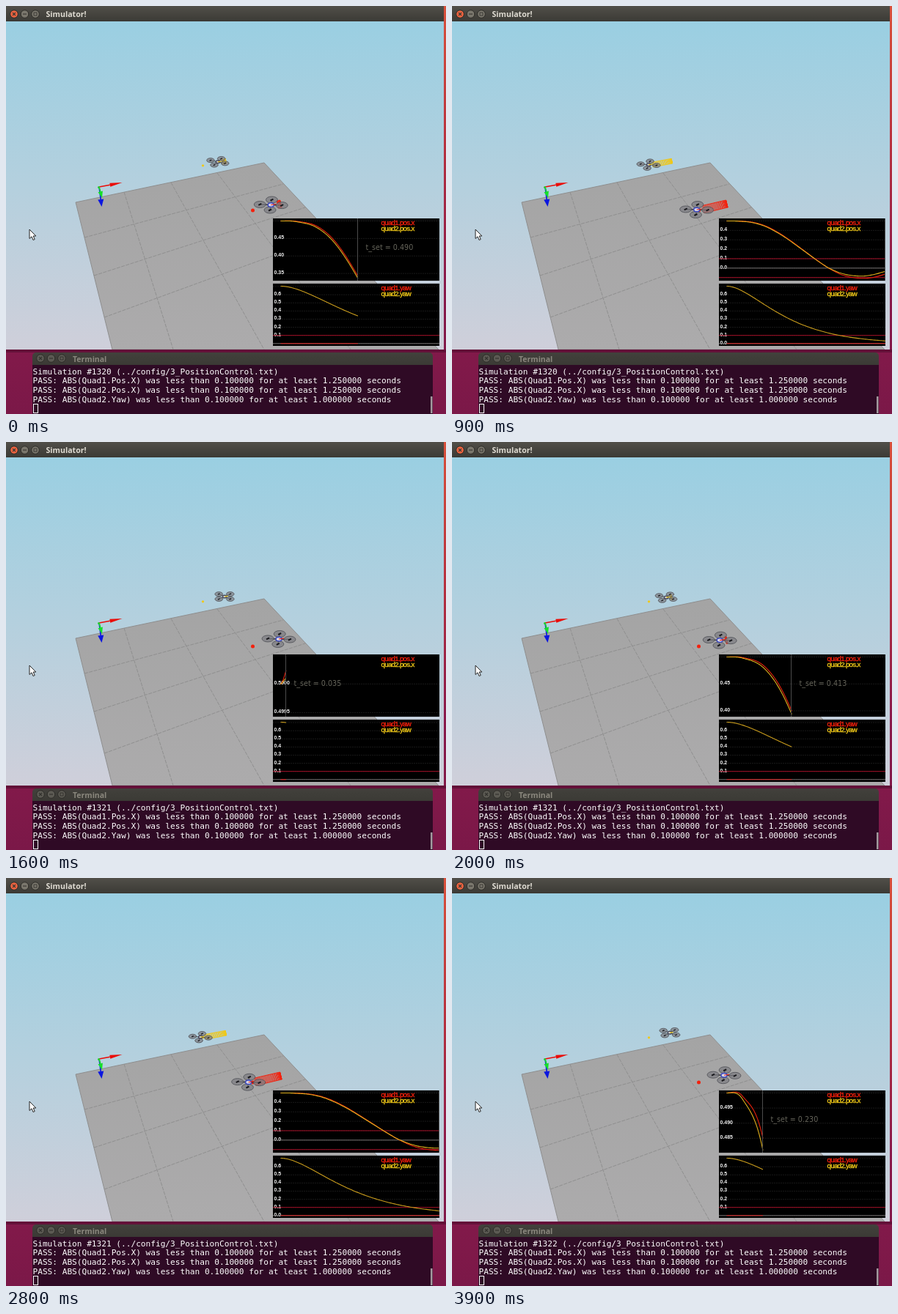
Recreate the animation shown at these times as an HTML page with a canvas. Size 600 by 557 pixels, loop 4 s.

```html
<!DOCTYPE html>
<html lang="en">
<head>
<meta charset="utf-8">
<title>Simulator</title>
<style>
  html, body { margin: 0; width: 100%; height: 100%; overflow: hidden; background: #7c1a48; }
  canvas { display: block; }
</style>
</head>
<body>
<canvas id="stage" width="600" height="557"></canvas>
<script>
const ctx = document.getElementById('stage').getContext('2d');
const RED = '#f4200c', YELLOW = '#f0c818';

// Position over time as [seconds, metres] for both vehicles.
const PATH1 = [[0, .5], [.1, .499], [.23, .485], [.35, .439], [.49, .342], [.65, .2], [.785, .076], [.88, -.002],
  [1, -.075], [1.14, -.107], [1.25, -.1], [1.39, -.055], [1.557, .005], [1.75, .035], [2.2, .015]];
const PATH2 = [[0, .5], [.1, .498], [.23, .481], [.35, .433], [.49, .336], [.65, .196], [.785, .075], [.88, 0],
  [1, -.06], [1.14, -.085], [1.25, -.072], [1.39, -.025], [1.557, .033], [1.75, .05], [2.2, .015]];

function sample(path, t) {
  let i = 0;
  while (i < path.length - 2 && path[i + 1][0] < t) i++;
  const slope = k => {
    if (k === 0) return 0;
    const a = path[k - 1], b = path[Math.min(k + 1, path.length - 1)];
    return (b[1] - a[1]) / (b[0] - a[0]);
  };
  const [t0, v0] = path[i], [t1, v1] = path[i + 1];
  const h = t1 - t0, u = (t - t0) / h, w = 1 - u;
  return v0 * (1 + 2 * u) * w * w + h * slope(i) * u * w * w
    + v1 * u * u * (3 - 2 * u) - h * slope(i + 1) * u * u * w;
}

const pos1 = t => sample(PATH1, t);
const pos2 = t => sample(PATH2, t);
const yaw = t => .705 * (1 + 3.55 * t) * Math.exp(-3.55 * t);

function settleTime(t) {
  let s = t;
  while (s > 0 && Math.abs(pos1(s)) < .055) s -= .005;
  return s;
}

function rect(x, y, w, h, fill) {
  ctx.fillStyle = fill;
  ctx.fillRect(x, y, w, h);
}

function line(points, color, width = 1, dash = []) {
  ctx.beginPath();
  points.forEach(([x, y]) => ctx.lineTo(x, y));
  ctx.strokeStyle = color;
  ctx.lineWidth = width;
  ctx.setLineDash(dash);
  ctx.stroke();
  ctx.setLineDash([]);
}

function polygon(points, fill) {
  ctx.beginPath();
  points.forEach(([x, y]) => ctx.lineTo(x, y));
  ctx.closePath();
  ctx.fillStyle = fill;
  ctx.fill();
}

function ellipse(x, y, rx, ry, fill, stroke, width = 1) {
  ctx.beginPath();
  ctx.ellipse(x, y, rx, ry, 0, 0, 7);
  if (fill) { ctx.fillStyle = fill; ctx.fill(); }
  if (stroke) { ctx.strokeStyle = stroke; ctx.lineWidth = width; ctx.stroke(); }
}

function text(str, x, y, font, color, baseline = 'alphabetic') {
  ctx.font = font;
  ctx.fillStyle = color;
  ctx.textBaseline = baseline;
  ctx.fillText(str, x, y);
}

function gradient(y0, y1, ...colors) {
  const g = ctx.createLinearGradient(0, y0, 0, y1);
  colors.forEach((c, i) => g.addColorStop(i / (colors.length - 1), c));
  return g;
}

function titleBar(x, y, w, h, radius, active) {
  ctx.beginPath();
  ctx.roundRect(x, y, w, h, [radius, radius, 0, 0]);
  ctx.fillStyle = gradient(y, y + h, active ? '#514f49' : '#42413c', '#3b3a35');
  ctx.fill();
  const cy = y + h / 2 + (active ? .5 : -.5);
  const ring = '#2e2d29';
  [11, 25.5, 40].forEach((dx, i) => {
    const cx = x + dx, mark = active ? '#3b3934' : '#34332f';
    ellipse(cx, cy, 5.3, 5.3, active ? (i ? '#7a776d' : '#ee6440') : '#5c5a53', ring);
    if (i === 0) {
      line([[cx - 2, cy - 2], [cx + 2, cy + 2]], mark, 1.2);
      line([[cx + 2, cy - 2], [cx - 2, cy + 2]], mark, 1.2);
    } else if (i === 1) line([[cx - 2.5, cy], [cx + 2.5, cy]], mark, 1.2);
    else {
      ctx.lineWidth = 1;
      ctx.strokeStyle = mark;
      ctx.strokeRect(cx - 2, cy - 2, 4, 4);
    }
  });
}

function drawDesktop() {
  rect(0, 0, 600, 557, gradient(0, 557, '#d8513c', '#b8323f', '#8a1b4c', '#7b1848'));
  rect(0, 469, 600, 4, 'rgba(40,0,25,.35)');
}

function drawTerminal(number) {
  titleBar(36, 473, 546, 17, 5, false);
  text('Terminal', 91, 485.5, 'bold 10.5px "Open Sans", sans-serif', '#8b887e');
  rect(36, 490, 546, 67, '#2f0a25');
  const check = (name, time) => `PASS: ABS(${name}) was less than 0.100000 for at least ${time} seconds`;
  const rows = [
    `Simulation #${number} (../config/3_PositionControl.txt)`,
    check('Quad1.Pos.X', '1.250000'),
    check('Quad2.Pos.X', '1.250000'),
    check('Quad2.Yaw', '1.000000'),
  ];
  rows.forEach((row, i) =>
    text(row, 36.5, 502.5 + i * 12.7, '11.14px "DejaVu Sans Mono", monospace', '#fff'));
  ctx.lineWidth = 1;
  ctx.strokeStyle = '#fff';
  ctx.strokeRect(37.5, 543.5, 6, 12);
  rect(579, 533, 2.5, 23, '#a49a9f');
}

function arrow(x0, y0, x1, y1, head, half, color) {
  const len = Math.hypot(x1 - x0, y1 - y0), ux = (x1 - x0) / len, uy = (y1 - y0) / len;
  const bx = x1 - ux * head, by = y1 - uy * head;
  line([[x0, y0], [bx, by]], color, 1.6);
  polygon([[x1, y1], [bx - uy * half, by + ux * half], [bx + uy * half, by - ux * half]], color);
}

function drawWorld() {
  rect(0, 21, 597, 448, gradient(21, 469, '#9acfe2', '#b4d0de', '#cfcfda'));
  const floor = [[95, 268], [352, 214], [590, 469], [145, 469]];
  polygon(floor, gradient(214, 469, '#a4a4a4', '#acabac'));
  line([...floor, floor[0]], '#8e8e8e', 1);
  const grid = [
    [[107, 316], [378, 243]], [[120, 368], [408, 275]], [[134, 425], [443, 312]],
    [[161, 254], [228, 469]], [[225, 241], [352, 469]], [[288, 228], [470, 469]],
  ];
  grid.forEach(g => line(g, '#8f8f8f', 1, [5, 1.5]));
  arrow(127, 247, 130.5, 274, 10, 4, '#0b16e0');
  arrow(127, 247, 131, 262, 9, 3.3, '#14e028');
  arrow(127, 247, 158.5, 241, 17, 2.6, '#ea0c08');
  ellipse(126.5, 247.5, 1.5, 1.5, '#20d030');
}

const quad1 = {
  pos: pos1, angle: () => .08, x: 338, y: 277, dx: 68, dy: -16, size: 1,
  radius: [15, 7], color: RED, body: '#3c48c0', target: [336.5, 279],
};
const quad2 = {
  pos: pos2, angle: t => .15 + yaw(t) * .9, x: 270, y: 216.3, dx: 56, dy: -10.6, size: .66,
  radius: [11, 4.8], color: YELLOW, body: '#4a4a58', target: [268.5, 217.8],
};

function drawQuad(q, t) {
  const at = s => [q.x + q.dx * q.pos(s), q.y + q.dy * q.pos(s)];
  const [cx, cy] = at(t), k = q.size;

  ellipse(...q.target, 2.5 * k, 2.5 * k, q.color);
  const upper = [], lower = [];
  for (let s = 0; s <= t; s += .03) {
    const [x, y] = at(s);
    if (x < cx + 5 * k) continue;
    const a = [x + 1.5 * k, y - 4 * k], b = [x + 4 * k, y + 6 * k];
    line([a, b], q.color, 1);
    upper.push(a);
    lower.push(b);
  }
  line(upper, q.color);
  line(lower, q.color);

  const angle = q.angle(t);
  const rotors = [0, 1, 2, 3].map(i => {
    const a = angle + i * Math.PI / 2;
    return [cx + q.radius[0] * Math.cos(a), cy + q.radius[1] * Math.sin(a)];
  }).sort((a, b) => a[1] - b[1]);
  rotors.forEach(([x, y]) => {
    line([[cx, cy], [x, y]], '#33333a', 1.4 * k);
    ellipse(x, y, 8 * k, 4.5 * k, 'rgba(125,125,130,.72)', '#55565c', .9);
    line([[x - 2 * k, y + k], [x + 2 * k, y - k]], '#18181c', 2 * k);
  });
  ellipse(cx, cy, 4 * k, 2.8 * k, '#d8d8e4', q.body, 1.5);
  line([[cx, cy], [cx + 7 * k, cy - k]], q.color, 1.2);
}

function drawPointer() {
  const shape = [[32, 305], [32, 317.5], [35, 314.8], [37, 319.5], [39.2, 318.5], [37.2, 314], [40.8, 314]];
  polygon(shape, '#fff');
  line([...shape, shape[0]], '#222', 1);
}

function legend(str, y, color) {
  ctx.letterSpacing = '-0.7px';
  text(str, 511.5, y, '9.7px "Liberation Sans", Arial, sans-serif', color, 'middle');
  ctx.strokeStyle = color;
  ctx.lineWidth = .35;
  ctx.strokeText(str, 511.5, y);
  ctx.letterSpacing = '0px';
}

function tickStep(span) {
  let step = .0001, five = true;
  while (span / step > 8) {
    step *= five ? 5 : 2;
    five = !five;
  }
  return step;
}

function drawPlot(top, range, t, curves, names, showZero) {
  const [lo, hi] = range;
  const xOf = s => 374.5 + 216.5 * s / Math.max(1.007, t);
  const yOf = v => top + 3.5 + (hi - v) / (hi - lo) * 78.3;
  const within = v => v >= lo - 1e-6 && v <= hi + 1e-6;
  rect(364, top, 227, 85, '#000');

  const step = tickStep(hi - lo), digits = Math.ceil(-Math.log10(step) - 1e-6);
  for (let i = Math.ceil(lo / step - 1e-6); i * step <= hi; i++) {
    const v = i * step, y = yOf(v);
    line([[364, y], [591, y]], '#202020', .8, [2, 1]);
    if (y > top + 9 && (v > 1e-9 || showZero && v > -1e-9))
      text(v.toFixed(digits), 365.5, y - 1, 'bold 7px "Liberation Sans", Arial, sans-serif', '#eee', 'middle');
  }
  if (within(0)) line([[364, yOf(0)], [591, yOf(0)]], '#747070', 1);
  [.1, -.1].filter(within).forEach(v => line([[364, yOf(v)], [591, yOf(v)]], '#a50e26', 1));

  curves.forEach(([f, color]) => {
    const points = [];
    for (let i = 0; i <= 120; i++) points.push([xOf(t * i / 120), yOf(f(t * i / 120))]);
    line(points, color, 1.1);
  });
  legend(names[0], top + 6, RED);
  legend(names[1], top + 14.5, YELLOW);
  return xOf;
}

function drawPlots(t) {
  let lo = .5;
  for (let s = 0; s <= t; s += .005) lo = Math.min(lo, pos1(s), pos2(s));
  lo = Math.min(lo, pos2(t));
  const range = .5 - lo < .001 ? [.49947, .50047] : [lo, .5];
  const xOf = drawPlot(290, range, t, [[pos1, '#e8200c'], [pos2, '#e0b01c']], ['quad1.pos.x', 'quad2.pos.x'], true);
  const settled = settleTime(t), x = Math.round(xOf(settled)) - .5;
  if (x < 591) line([[x, 290], [x, 375]], '#4c4c4c', 1);
  text(`t_set = ${settled.toFixed(3)}`, x + 11, 333, '9.6px "DejaVu Sans", sans-serif', '#65645a');

  drawPlot(379, [0, .705], t, [[() => 0, '#d81c1c'], [yaw, '#c99c1c']], ['quad1.yaw', 'quad2.yaw'], t > 1);
}

// Each run restarts abruptly; the loop begins in the middle of one.
function runAt(step) {
  if (step < 16) return [1320, .49 + .0972 * step];
  if (step < 37) return [1321, .035 + .0945 * (step - 16)];
  return [1322, .035 + .0975 * (step - 37)];
}

function draw(step) {
  const [number, t] = runAt(step);
  drawDesktop();
  drawTerminal(number);
  ctx.save();
  ctx.beginPath();
  ctx.rect(0, 0, 597, 469);
  ctx.clip();
  drawWorld();
  drawQuad(quad2, t);
  drawQuad(quad1, t);
  drawPlots(t);
  ctx.restore();
  titleBar(0, 0, 597, 21, 0, true);
  text('Simulator!', 54.5, 14.8, 'bold 10.6px "Open Sans", sans-serif', '#dfdbd2');
  drawPointer();
}

function tick() {
  draw(Math.floor(performance.now() % 4000 / 100));
  requestAnimationFrame(tick);
}
tick();
</script>
</body>
</html>
```
